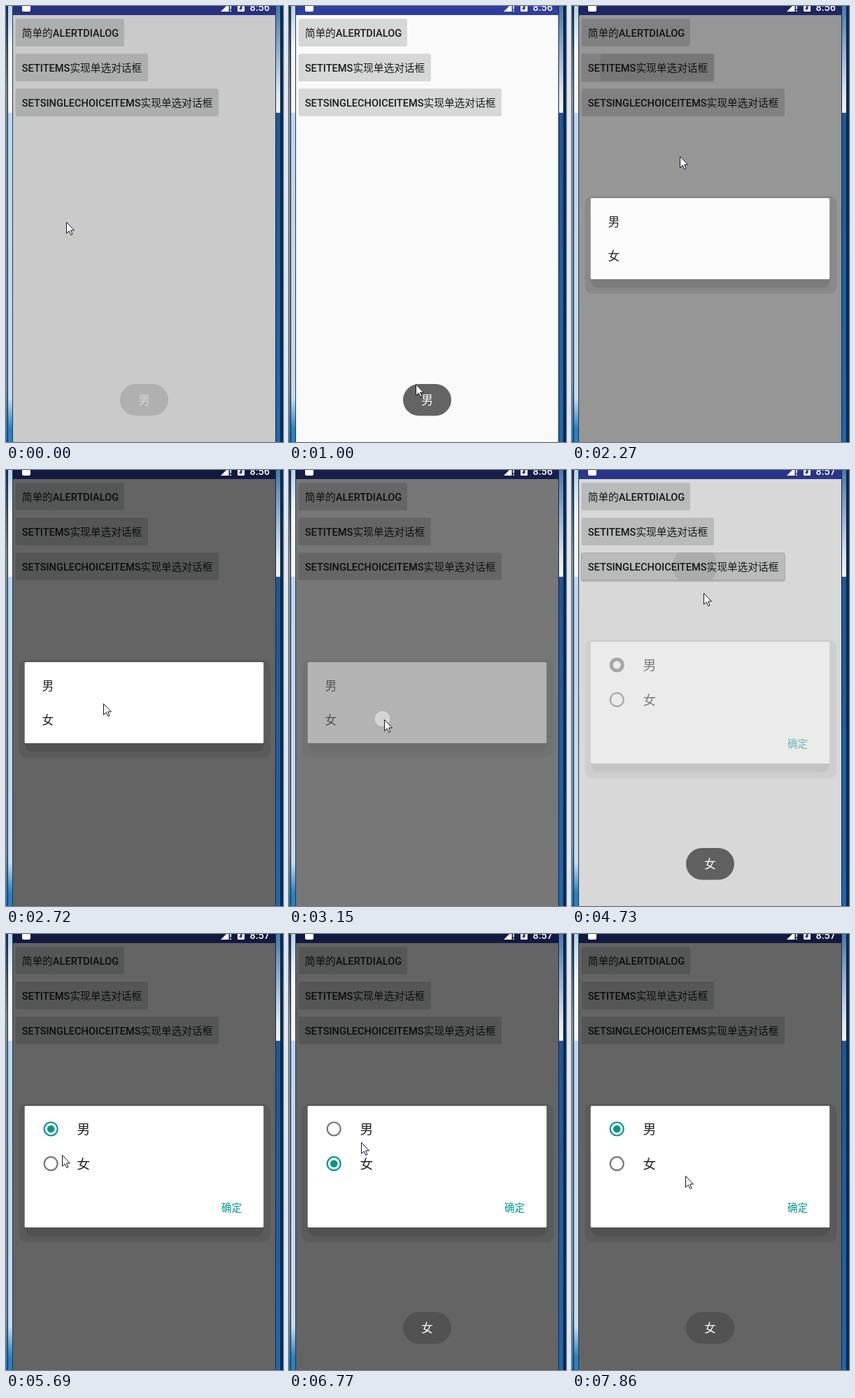
An HTML page that plays this animation: 396x624 px, repeating every 8 s.

```html
<!DOCTYPE html>
<html lang="zh-CN">
<head>
<meta charset="utf-8">
<title>Dialog demo</title>
<style>
html, body { margin: 0; width: 100%; height: 100%; overflow: hidden; background: #062a50; }
svg { display: block; width: 396px; height: 624px; }
text { font-family: Roboto, "Noto Sans CJK SC", "Noto Sans CJK", sans-serif; }
.btn { font-size: 14.6px; font-weight: 500; fill: #1c1c1c; }
.btn .cjk { font-size: 14.7px; font-weight: 400; }
.item { font-size: 16.7px; fill: #212121; }
.choice { font-size: 18.7px; fill: #212121; }
.ok { font-size: 14.6px; font-weight: 500; fill: #009688; }
</style>
</head>
<body>
<svg id="stage" viewBox="0 0 396 624" width="396" height="624">
  <defs>
    <linearGradient id="edgeL" x2="0" y2="1">
      <stop offset="0" stop-color="#b4d2ee"/><stop offset=".1" stop-color="#f2f8fe"/>
      <stop offset=".244" stop-color="#f2f8fe"/><stop offset=".246" stop-color="#b8d8f8"/>
      <stop offset=".9" stop-color="#c2dcf5"/><stop offset=".97" stop-color="#2484c6"/>
    </linearGradient>
    <linearGradient id="outerL" x2="0" y2="1">
      <stop offset="0" stop-color="#103050"/><stop offset=".2" stop-color="#7c8793"/>
      <stop offset=".86" stop-color="#7c8793"/><stop offset="1" stop-color="#1770b0"/>
    </linearGradient>
    <linearGradient id="edgeR" x2="0" y2="1">
      <stop offset="0" stop-color="#4a78ad"/><stop offset=".2" stop-color="#dbe7f3"/>
      <stop offset=".244" stop-color="#eef4fa"/><stop offset=".246" stop-color="#1f5796"/>
      <stop offset="1" stop-color="#1f68ae"/>
    </linearGradient>
    <clipPath id="phone"><rect x="10" width="375" height="624"/></clipPath>
  </defs>

  <rect width="396" height="624" fill="#062a50"/>
  <rect width="2" height="624" fill="url(#outerL)"/>
  <rect x="2" width="1" height="624" fill="#1d2b3a"/>
  <rect x="3" width="6" height="624" fill="url(#edgeL)"/>
  <rect x="9" width="1" height="624" fill="#2b3440"/>
  <rect x="385" width="1" height="624" fill="#1a2635"/>
  <rect x="386" width="6" height="624" fill="url(#edgeR)"/>

  <g clip-path="url(#phone)">
    <rect x="10" width="375" height="624" fill="#fafafa"/>
    <rect x="10" width="375" height="13" fill="#303f9f"/>
    <g id="buttons"></g>
    <rect id="dim" x="10" width="375" height="624"/>
    <g fill="#fff">
      <rect x="23" y="-4" width="12" height="12" rx="2"/>
      <path d="M307 8L318.5 -3.5V8ZM320.3 -4H322V4.5H320.3ZM320.3 6.2H322V8H320.3Z"/>
      <rect x="331" y="-6" width="10" height="14" rx="1"/>
      <path d="M338.5 0H335.5L333 4.5H335.5L334.500 7.5L338.5 2.5H336.5Z" fill="#26317a"/>
      <text id="clock" x="348.5" y="6.5" font-size="14.4" font-weight="500"></text>
    </g>
    <g id="list"></g>
    <g id="single"></g>
    <g id="toast">
      <rect x="163" y="541" width="69" height="45.5" rx="22.7" fill="#4f4f4f" fill-opacity=".873"/>
      <text id="message" x="197.5" y="570" font-size="16.6" text-anchor="middle" fill="#fff"></text>
    </g>
  </g>
  <circle id="touch" r="11.5" fill="#fff" fill-opacity=".45" stroke="#9a9ac0" stroke-opacity=".6"/>
  <path id="cursor" d="M.5 .5V16.5L4.2 13L6.8 18.6L9 17.600L6.600 12H11.500Z"
    fill="#fff" stroke="#14142a" stroke-linejoin="round"/>
</svg>
<script>
const LOOP = 8000;
const STEP = 142.5;           // the screen refreshes at this interval
const OPEN_DELAY = 172;       // tap to dialog
const TOAST_DELAY = 185;      // choice to toast
const RADIO_DELAY = 370;      // tap to radio change
const TEAL = '#009688', GRAY = '#757575';

// Taps, in order of time
const tapItems = 1875, tapPick = 3000, tapSingle = 4412, tapFemale = 5982, tapMale = 7204;
const taps = [tapItems, tapPick, tapSingle, tapFemale, tapMale];

const dialogs = [
  { id: 'list', open: -2000, close: -305 },
  { id: 'list', open: tapItems + OPEN_DELAY, close: tapPick },
  { id: 'single', open: tapSingle + OPEN_DELAY, close: Infinity }
];
const choices = [{ at: -305, text: '男' }, { at: tapPick, text: '女' }, { at: tapFemale, text: '女' }];

// Where the pointer rests
const stops = [
  { from: 0, to: 140, x: 86, y: 309 },
  { from: 990, to: 1140, x: 181, y: 541 },
  { from: 1700, to: tapItems, x: 125, y: 88 },
  { from: 2280, to: 2290, x: 154, y: 215 },
  { from: 2850, to: 3140, x: 136, y: 357 },
  { from: 3560, to: tapSingle + 140, x: 176, y: 137 },
  { from: 4700, to: 4710, x: 188, y: 176 },
  { from: 5690, to: 5710, x: 80, y: 316 },
  { from: 5840, to: tapFemale + 140, x: 90, y: 325 },
  { from: 7060, to: tapMale + 140, x: 110, y: 284 },
  { from: 7830, to: LOOP, x: 162, y: 346 }
];

const $ = id => document.getElementById(id);
const clamp = k => Math.max(0, Math.min(1, k));
const smooth = k => (k = clamp(k), k * k * (3 - 2 * k));

function set(el, attrs) {
  for (const k in attrs) el.setAttribute(k, attrs[k]);
}
function add(parent, tag, attrs, text) {
  const el = document.createElementNS('http://www.w3.org/2000/svg', tag);
  set(el, attrs);
  if (text) el.textContent = text;
  parent.appendChild(el);
  return el;
}

function pointer(t) {
  const i = stops.findIndex(s => t <= s.to);
  const b = stops[i], a = stops[i - 1] || b;
  const k = a === b ? 1 : smooth((t - a.to) / (b.from - a.to));
  return { x: Math.round(a.x + (b.x - a.x) * k), y: Math.round(a.y + (b.y - a.y) * k) };
}

const ripples = [];
function addRipple(parent, box, start) {
  const clip = 'clip' + start, at = pointer(start);
  add(add(parent, 'clipPath', { id: clip }), 'rect', box);
  const el = add(parent, 'circle', { cx: at.x, cy: at.y, 'clip-path': `url(#${clip})` });
  ripples.push({ el, start });
}

const lifts = [];
function addButton(y, width, parts, tap) {
  const g = add($('buttons'), 'g', {});
  const box = { x: 14, y, width, height: 38.5, rx: 2 };
  if (tap) {
    const el = add(g, 'rect', { x: 12.5, y: y - .5, width: width + 3, height: 42, rx: 4 });
    lifts.push({ el, start: tap });
  }
  add(g, 'rect', { x: 13.5, y, width: width + 1, height: 39.5, rx: 2.5, 'fill-opacity': .12 });
  add(g, 'rect', { ...box, fill: '#d6d7d7' });
  if (tap) addRipple(g, box, tap);
  const label = add(g, 'text', { class: 'btn', x: 22.7, y: y + 25.1 });
  for (const s of parts) add(label, 'tspan', { class: /[A-Z]/.test(s) ? 'latin' : 'cjk' }, s);
}

function addPanel(g, y, height) {
  add(g, 'rect', { x: 18.5, y: y - 3, width: 360, height: height + 24, rx: 11, 'fill-opacity': .09 });
  add(g, 'rect', { x: 27, y, width: 341.5, height: height + 12.5, rx: 11, 'fill-opacity': .1 });
  add(g, 'rect', { x: 26.7, y, width: 341.5, height, rx: 1.5, fill: '#fff' });
}
function addRows(g, y, cls, x, rowTaps) {
  ['男', '女'].forEach((s, i) => {
    const top = y + i * 49.7;
    if (rowTaps[i]) addRipple(g, { x: 27, y: top, width: 341, height: 50 }, rowTaps[i]);
    add(g, 'text', { class: cls, x, y: top + 31.5 }, s);
  });
}

function addRadio(cy) {
  const at = { cx: 64.2, cy };
  return { ring: add($('single'), 'circle', { ...at, fill: 'none' }), dot: add($('single'), 'circle', at) };
}
// The ring thickens inwards, then opens around a dot
function drawRadio({ ring, dot }, k) {
  const w = 2.2 + 3 * clamp(1 - Math.abs(k - .48) / .45);
  const color = k > .5 ? TEAL : GRAY;
  set(ring, { r: 10.6 - w / 2, 'stroke-width': w, stroke: color });
  set(dot, { r: k > .5 ? 5.3 * k : 0, fill: color });
}

addButton(18.5, 154.5, ['简单的', 'ALERTDIALOG']);
addButton(68.5, 188.5, ['SETITEMS', '实现单选对话框'], tapItems);
addButton(118.5, 289.5, ['SETSINGLECHOICEITEMS', '实现单选对话框'], tapSingle);

addPanel($('list'), 275, 116);
addRows($('list'), 283.2, 'item', 51.5, [0, tapPick]);

addPanel($('single'), 246, 174);
addRows($('single'), 254.5, 'choice', 101.5, [tapMale, tapFemale]);
const male = addRadio(279), female = addRadio(328.7);
add($('single'), 'text', { class: 'ok', x: 308, y: 396.7 }, '确定');

function panelOpacity({ open, close }, t) {
  return Math.min(clamp((t - open) / 240), clamp(1 - (t - close) / 240));
}
function dimOpacity({ open, close }, t) {
  const out = clamp((t - close) / 370);
  return .6 * Math.min(smooth((t - open) / 380), 1 - out * out);
}
function toastOpacity(age) {
  return Math.min(clamp(age / 500), clamp(1 - (age - 1700) / 280));
}
const radioPhase = (t, start) => clamp((t - start) / 260);

function draw(t) {
  set($('dim'), { 'fill-opacity': Math.max(...dialogs.map(d => dimOpacity(d, t))) });
  for (const id of ['list', 'single']) {
    const own = dialogs.filter(d => d.id === id);
    set($(id), { opacity: Math.max(...own.map(d => panelOpacity(d, t))) });
  }

  const choice = choices.filter(c => c.at + TOAST_DELAY <= t).pop();
  $('message').textContent = choice.text;
  set($('toast'), { opacity: toastOpacity(t - choice.at - TOAST_DELAY) });
  $('clock').textContent = t < 3840 ? '8:56' : '8:57';

  for (const { el, start } of ripples) {
    const age = Math.max(0, t - start);
    set(el, { r: (age / 92) ** 3, 'fill-opacity': .08 * clamp(1 - (age - 420) / 200) });
  }
  for (const { el, start } of lifts) {
    set(el, { 'fill-opacity': t < start ? 0 : .16 * clamp(1 - (t - start - 300) / 150) });
  }

  const toFemale = radioPhase(t, tapFemale + RADIO_DELAY);
  const toMale = radioPhase(t, tapMale + RADIO_DELAY);
  drawRadio(male, radioPhase(t, dialogs[2].open) - toFemale + toMale);
  drawRadio(female, toFemale - toMale);

  const { x, y } = pointer(t);
  set($('cursor'), { transform: `translate(${x} ${y})` });
  const tap = taps.find(s => t >= s && t < s + 200);
  set($('touch'), { cx: x - 2.5, cy: y - 1, opacity: tap ? 1 : 0 });
}

const begin = performance.now();
function tick() {
  const t = (performance.now() - begin) % LOOP;
  draw(Math.floor(t / STEP + .1) * STEP);
  requestAnimationFrame(tick);
}
tick();
</script>
</body>
</html>
```
